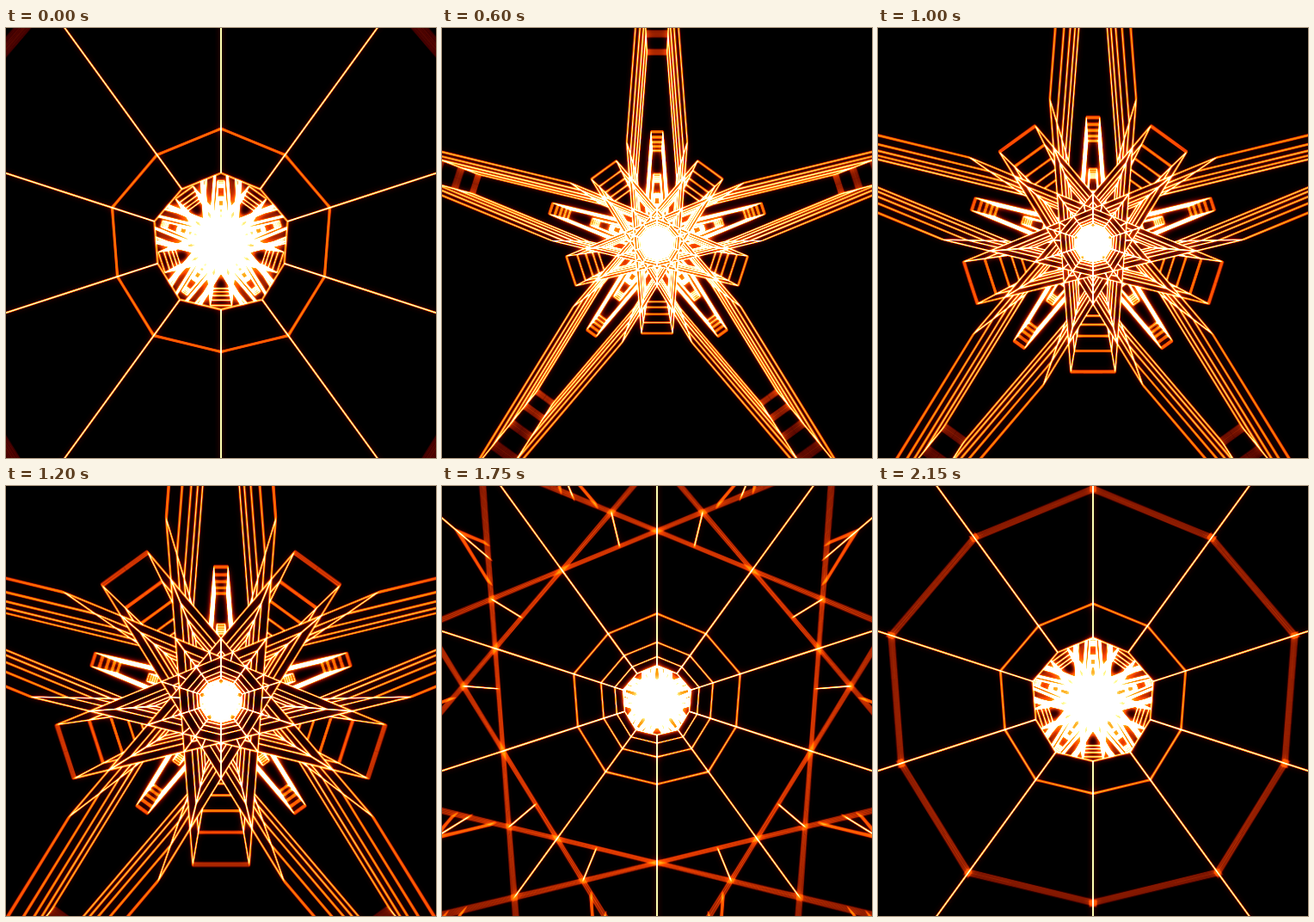
Recreate the animation shown at these times as an HTML page with a canvas. Size 500 px wide and 500 px high, loop 2200 ms.

```html
<!DOCTYPE html>
<html>
<head>
<meta charset="utf-8">
<title>Star tunnel</title>
<style>
html, body { margin: 0; width: 100%; height: 100%; overflow: hidden; background: #000; }
canvas { display: block; width: 500px; height: 500px; }
</style>
</head>
<body>
<canvas id="stage" width="500" height="500"></canvas>
<script>
const SIZE = 500, MID = SIZE / 2, PAD = 10, WIDE = SIZE + 2 * PAD;
const STEPS = 44, STEP_MS = 50;
const SPEED = 0.00132;            // depth travelled per step
const PERIOD = SPEED * STEPS;     // depth between two star prisms
const GAP = 0.00478;              // depth between layers of a prism
const LAYERS = 5, DEPTH = GAP * (LAYERS - 1);
const START = -0.00682, NEAR = 0.0004;
const SMEAR = 0.00013, GLOW = 1.3;
const TAU = Math.PI * 2;

// Left half of one blade; five rotated blades make the cross-section.
const half = [[0, 12.1], [-0.64, 12.1], [-1.247, 4.15], [-0.642, -3.72], [0, -3.72]];
const edges = half.slice(1).map((p, i) => [half[i], p]);

function turn([x, y], angle, flip) {
  const c = Math.cos(angle), s = Math.sin(angle), fx = x * flip;
  return [fx * c - y * s, fx * s + y * c];
}

const walls = [];
for (let k = 0; k < 5; k++)
  for (const flip of [1, -1])
    for (const e of edges) walls.push(e.map(p => turn(p, k * TAU / 5, flip)));

const cross = (a, b) => a[0] * b[1] - a[1] * b[0];
const sub = (a, b) => [a[0] - b[0], a[1] - b[1]];
const mix = (a, b, t) => [a[0] + (b[0] - a[0]) * t, a[1] + (b[1] - a[1]) * t];

// Position along ab and cd where their lines meet, or null.
function meet(a, b, c, d) {
  const r = sub(b, a), s = sub(d, c), den = cross(r, s);
  if (Math.abs(den) < 1e-9) return null;
  const ac = sub(c, a);
  return [cross(ac, s) / den, cross(ac, r) / den];
}

// Radii at which a ray from the axis through p hits the walls.
function hits(p) {
  const len = Math.hypot(p[0], p[1]), radii = [];
  for (const [c, d] of walls) {
    const m = meet([0, 0], p, c, d);
    if (m && m[0] > 0 && m[1] > -1e-6 && m[1] < 1 + 1e-6) radii.push(m[0] * len);
  }
  return radii;
}

const probe = p => ({ p, rho: Math.hypot(p[0], p[1]), radii: hits(p) });

// Short pieces of each edge, tested for visibility at their middle.
const chains = edges.map(([a, b]) => {
  const n = Math.ceil(Math.hypot(...sub(b, a)) / 0.02);
  return Array.from({ length: n }, (_, i) => ({
    from: mix(a, b, i / n), to: mix(a, b, (i + 1) / n),
    ...probe(mix(a, b, (i + 0.5) / n))
  }));
});

// Corners and crossings carry the lines that run along the depth.
const ribs = half.slice(1, 4).map(probe);
for (const [a, b] of edges)
  for (const [c, d] of walls) {
    const m = meet(a, b, c, d);
    if (m && m.every(t => t > 1e-6 && t < 1 - 1e-6)) ribs.push(probe(mix(a, b, m[0])));
  }

function visible({ rho, radii }, u, fronts) {
  const r = rho / u;
  for (const front of fronts) {
    if (front >= u) break;
    for (const radius of radii) {
      const h = radius / r;
      if (h < u - 2e-5 && h >= front && h <= front + DEPTH) return false;
    }
  }
  return true;
}

function buildPath(step) {
  const path = new Path2D(), fronts = [];
  for (let k = 0; k < 7; k++) {
    const front = START - SPEED * step + k * PERIOD;
    if (front + DEPTH > NEAR) fronts.push(front);
  }
  const move = (p, u) => path.moveTo(p[0] / u, p[1] / u);
  const line = (p, u) => path.lineTo(p[0] / u, p[1] / u);

  for (const front of fronts) {
    for (let i = 0; i < LAYERS; i++) {
      const u = front + i * GAP;
      if (u < NEAR) continue;
      for (const chain of chains) {
        let last = null;
        for (const c of chain) {
          if (visible(c, u, fronts)) {
            if (!last) move(c.from, u);
            last = c;
          } else if (last) {
            line(last.to, u);
            last = null;
          }
        }
        if (last) line(last.to, u);
      }
    }
    const a = Math.max(front, NEAR), ratio = (front + DEPTH) / a, n = 80;
    for (const rib of ribs) {
      let open = false;
      for (let i = 0; i < n; i++) {
        const u0 = a * ratio ** (i / n), u1 = a * ratio ** ((i + 1) / n);
        const seen = visible(rib, Math.sqrt(u0 * u1), fronts);
        if (seen && !open) move(rib.p, u0);
        if (!seen && open) line(rib.p, u0);
        open = seen;
      }
      if (open) line(rib.p, front + DEPTH);
    }
  }
  return path;
}

function layer() {
  const c = document.createElement('canvas');
  c.width = c.height = WIDE;
  return c.getContext('2d', { willReadFrequently: true });
}
const lines = layer(), glow = layer();
const stage = document.getElementById('stage').getContext('2d');
const image = stage.createImageData(SIZE, SIZE);

function clear(g) {
  g.setTransform(1, 0, 0, 1, 0, 0);
  g.filter = 'none';
  g.fillStyle = '#000';
  g.fillRect(0, 0, WIDE, WIDE);
}

const pixels = g => g.getImageData(0, 0, WIDE, WIDE).data;

function sample(d, x, y) {
  const ix = x | 0, iy = y | 0, fx = x - ix, fy = y - iy;
  const i = (iy * WIDE + ix) * 4, j = i + WIDE * 4;
  const top = d[i] + (d[i + 4] - d[i]) * fx;
  const low = d[j] + (d[j + 4] - d[j]) * fx;
  return top + (low - top) * fy;
}

// Zoom blur whose length grows with the square of the radius.
function smear(d, dx, dy) {
  const r = Math.hypot(dx, dy), n = 2 + (r * r * SMEAR | 0), at = MID + PAD - 0.5;
  let sum = 0;
  for (let i = 0; i < n; i++) {
    const s = 1 + r * SMEAR * (i / (n - 1) - 0.5);
    sum += sample(d, at + dx * s, at + dy * s);
  }
  return sum / n / 255;
}

// Heat colours: black, red, orange, yellow, white.
const heat = Array.from({ length: 256 }, (_, i) => {
  const v = i / 255, byte = x => 255 * Math.min(1, Math.max(0, x));
  return [byte(v * 3.6), byte(v * 1.35 - 0.1), byte((v - 0.5) * 2)];
});

function draw(step) {
  const path = buildPath(step);
  clear(lines);
  lines.strokeStyle = lines.fillStyle = '#fff';
  lines.lineWidth = 1.15;
  lines.lineJoin = 'bevel';
  for (let k = 0; k < 5; k++)
    for (const flip of [1, -1]) {
      lines.setTransform(1, 0, 0, -1, MID + PAD, MID + PAD);
      lines.rotate(k * TAU / 5);
      lines.scale(flip, 1);
      lines.stroke(path);
    }
  lines.beginPath();
  lines.arc(0, 0, 5, 0, TAU);
  lines.fill();

  clear(glow);
  glow.filter = 'blur(4px)';
  glow.drawImage(lines.canvas, 0, 0);

  const sharp = pixels(lines), soft = pixels(glow), out = image.data;
  for (let y = 0, o = 0; y < SIZE; y++)
    for (let x = 0; x < SIZE; x++, o += 4) {
      const b = soft[((y + PAD) * WIDE + x + PAD) * 4] / 255;
      const v = smear(sharp, x + 0.5 - MID, y + 0.5 - MID) + GLOW * b * b;
      const c = heat[Math.min(255, Math.round(v * 255))];
      out[o] = c[0];
      out[o + 1] = c[1];
      out[o + 2] = c[2];
      out[o + 3] = 255;
    }
  stage.putImageData(image, 0, 0);
}

let shown = -1;
const begin = performance.now();
function tick() {
  const step = Math.floor((performance.now() - begin) / STEP_MS) % STEPS;
  if (step !== shown) draw(shown = step);
  requestAnimationFrame(tick);
}
tick();
</script>
</body>
</html>
```
